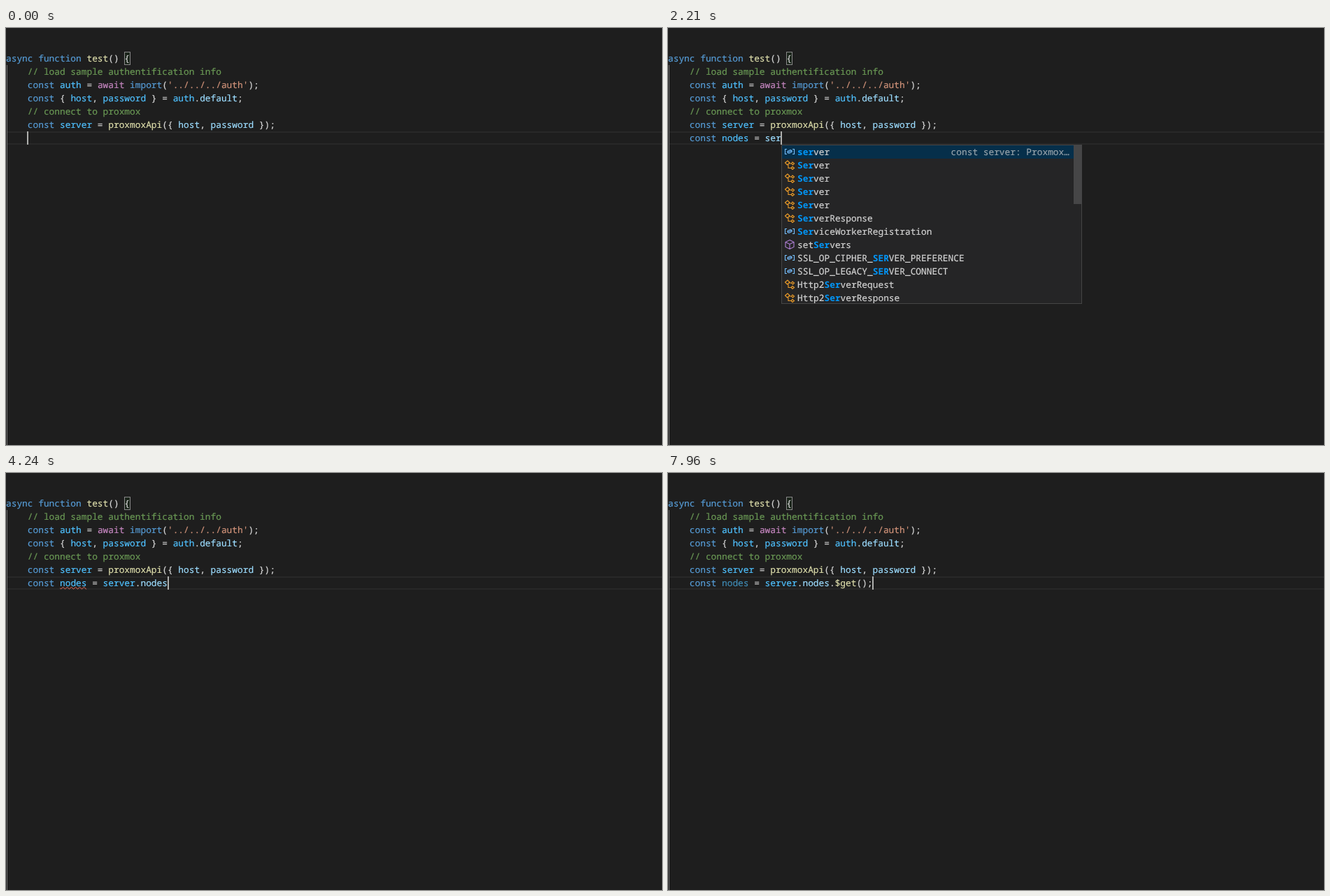
Write an HTML page that moves like this. It is 938 px wide and 597 px high and loops after 8 s.

```html
<!DOCTYPE html>
<html lang="en">
<head>
<meta charset="utf-8">
<title>Editor typing</title>
<style>
html, body { margin: 0; width: 100%; height: 100%; overflow: hidden; background: #1e1e1e; }
#stage {
  position: relative; width: 938px; height: 597px; overflow: hidden;
  background: #1e1e1e; color: #d4d4d4;
  font: 12.83px/18px "Noto Sans Mono", "DejaVu Sans Mono", monospace;
  font-variant-ligatures: none; text-rendering: geometricPrecision;
  -webkit-text-stroke: .2px currentColor;
}
#stage div, #stage svg { position: absolute; box-sizing: border-box; }
#lines, #parens { left: 0; top: 0; }
.row, .box { white-space: pre; }
.row { left: 0; height: 19px; }
.k { color: #569cd6; }
.f { color: #dcdcaa; }
.m { color: #6a9955; }
.c { color: #4fc1ff; }
.d { color: #4fc1ff; opacity: .667; }
.a { color: #c586c0; }
.s { color: #ce9178; }
.v { color: #9cdcfe; }
.t { color: #4ec9b0; }
#current { left: 2px; top: 148px; width: 940px; height: 19px; border: 2px solid #282828; border-width: 2px 0; }
#guide { left: 1px; top: 53px; width: 1px; height: 544px; background: #707070; }
#cursor { top: 148px; width: 2px; height: 19px; background: #aeafad; }
.match { width: 9px; height: 19px; border: 1px solid #888; background: rgba(0, 100, 0, .1); }
#squig { top: 163px; height: 4px; overflow: hidden; }
#squig path { fill: none; stroke: #f1705c; }
.box { background: #252526; border: 1px solid #454545; overflow: hidden; }
#list { top: 167px; width: 430px; }
.item { left: 0; width: 428px; height: 19px; }
.item.on { background: #062f4a; }
.item svg { left: 3px; top: 1px; width: 16px; height: 16px; fill: none; stroke-width: 1.1; }
.item b { color: #0097fb; -webkit-text-stroke: 0; }
.label { left: 22px; }
.detail { left: 241.6px; opacity: .7; }
#bar { left: 417px; top: 0; width: 11px; height: 84px; background: #464647; }
#hint { left: 277px; top: 23px; width: 305px; height: 125px; padding: 4px 5px; line-height: 19px; }
</style>
</head>
<body>
<div id="stage">
  <div id="current"></div>
  <div id="guide"></div>
  <div id="brace" class="match" style="left:169px;top:34px"></div>
  <div id="parens"><div class="match" style="left:269px;top:148px"></div><div class="match" style="left:277px;top:148px"></div></div>
  <div id="lines"></div>
  <div id="typed" class="row" style="top:148px"></div>
  <svg id="squig" height="4"><path/></svg>
  <div id="cursor"></div>
  <div id="list" class="box"></div>
  <div id="hint" class="box"></div>
</div>
<script>
const LOOP = 8000, CH = 7.697, ROW = 19;
const $ = id => document.getElementById(id);
const show = (id, on) => { $(id).style.display = on ? '' : 'none'; };
const esc = s => s.replace(/&/g, '&amp;').replace(/</g, '&lt;');

// "[k const]" becomes a span of class k
const paint = s => esc(s).replace(/\[(\w) ([^\]]*)\]/g, '<span class="$1">$2</span>');
const plain = s => s.replace(/\[\w |\]/g, '');

const lines = [
  '[k async] [k function] [f test]() {',
  '    [m // load sample authentification info]',
  "    [k const] [c auth] = [a await] [k import]([s '../../../auth']);",
  '    [k const] { [c host], [c password] } = [c auth].[v default];',
  '    [m // connect to proxmox]',
  '    [k const] [c server] = [f proxmoxApi]({ [v host], [v password] });'
];
$('lines').innerHTML = lines.map((s, i) =>
  `<div class="row" style="top:${34 + i * ROW}px">${paint(s)}</div>`).join('');

$('hint').innerHTML = paint(`[f $get](): [t Promise]<{
    [v node]: [t string];
    [v status]: [t string];
    [v level]?: [t string];
    [v uptime]?: [t number];
}[]>`);

const icons = {
  v: ['#75beff', 'M4 4.5H1.5v7H4M12 4.5h2.5v7H12M5 9.5v-2l4-2 2 1v2l-4 2zM5 7.5l2 1 4-2'],
  c: ['#ee9d28', 'M1.5 5l3.5-3 3 3-3.5 3zM7 6h4M6 7.5v5h4M10.5 6l1.5-2 2.5 2-2 2zM10 12.5l2-2 2.5 2-2.5 2z'],
  m: ['#b180d7', 'M8 1.5l6 3v7l-6 3-6-3v-7zM2 4.5l6 3 6-3M8 7.5v7'],
  p: ['#c5c5c5', 'M10 2a4 4 0 0 0-3 6L2 13l1.5 1.5L9 9a4 4 0 0 0 5-5l-2.5 2-2-2z'],
  k: ['#c5c5c5', 'M2 4h8M12 4h2M2 8h4M8 8h6M2 12h7M11 12h3']
};

// Each item is icon:label, with the matched letters between stars
const lists = {
  consts: { items: 'k:*const* v:*cons*ole m:*const*ructor c:*Const*antSourceNode m:*con*firm k:*cont*inue c:*Con*volverNode c:*Count*QueuingStrategy v:*c*ryp*to* c:*C*ustom*E*vent c:*C*anvasGradient c:*C*SSRule', bar: true },
  words: { items: 'k:*nodes* k:*node*List' },
  server: {
    items: 'v:*server* c:*Server* c:*Server* c:*Server* c:*Server* c:*Server*Response v:*Serv*iceWorker*Re*gistration m:set*Server*s v:SSL_OP_CIPHER_*SERVER*_PREFERENCE v:SSL_OP_LEGACY_*SERVER*_CONNECT c:Http2*Server*Request c:Http2*Server*Response',
    detail: 'const server: Proxmox…', bar: true
  },
  api: { items: 'p:access p:cluster p:nodes p:pools p:storage p:version', detail: '(property) nodes: { $…' },
  calls: { items: 'm:$ m:$get', detail: '(method) $get(): Prom…' }
};

// Bold only the first n matched letters
function mark(label, n) {
  return label.split('*').map((part, i) => {
    if (i % 2 === 0) return part;
    const hit = part.slice(0, n);
    n -= hit.length;
    return `<b>${hit}</b>${part.slice(hit.length)}`;
  }).join('');
}

function drawList({ list, sel, n }, col) {
  show('list', list);
  if (!list) return;
  const { items, detail = '', bar } = lists[list];
  const rows = items.split(' ');
  const el = $('list');
  el.style.left = Math.round(col * CH) + 'px';
  el.style.height = rows.length * ROW + 'px';
  el.innerHTML = rows.map((row, i) => {
    const [kind, label] = row.split(':');
    const [color, path] = icons[kind];
    const on = i === sel;
    return `<div class="item${on ? ' on' : ''}" style="top:${i * ROW}px">` +
      `<svg viewBox="0 0 16 16" stroke="${color}"><path d="${path}"/></svg>` +
      `<div class="label">${mark(label, n)}</div>` +
      (on ? `<div class="detail">${detail}</div>` : '') + '</div>';
  }).join('') + (bar ? '<div id="bar"></div>' : '');
}

function drawSquig(squig) {
  show('squig', squig);
  if (!squig) return;
  const [col, len] = squig, w = len * CH;
  let d = 'M0 1.5L1.5 3';
  for (let x = 1.5; x < w; x += 6) d += `L${x + 3} .5L${x + 6} 3`;
  $('squig').style.left = Math.round(col * CH) + 'px';
  $('squig').style.width = w + 'px';
  $('squig').firstElementChild.setAttribute('d', d);
}

const head = '[k const] ', dim = head + '[d nodes]', lit = head + '[c nodes]';
const under = [10, 5], call = ' = [c server].[v nodes]';

const steps = [
  [0, { code: '', caret: true, back: 0, squig: null, list: null, sel: 0, n: 9, brace: true, parens: false, hint: false }],
  [180, { code: '[v c]', list: 'consts', n: 1 }],
  [260, { code: '[v co]', n: 2 }],
  [340, { code: '[v con]', n: 3 }],
  [420, { code: '[v cons]', n: 4 }],
  [490, { code: '[k const]', n: 5 }],
  [660, { code: head, list: null }],
  [890, { squig: [4, 5] }],
  [970, { code: head + '[c n]', squig: null }],
  [1050, { code: head + '[c no]', list: 'words', n: 2 }],
  [1130, { code: head + '[c node]', n: 4 }],
  [1210, { code: head + '[d node][c s]', squig: [10, 4], n: 5 }],
  [1360, { code: dim + ' ', squig: under, list: null }],
  [1660, { code: dim + ' =' }],
  [1830, { code: dim + ' = ' }],
  [1910, { code: lit + ' = ', squig: null }],
  [1990, { code: lit + ' = [v s]' }],
  [2060, { list: 'server', n: 1 }],
  [2140, { code: lit + ' = [v se]', n: 2 }],
  [2210, { code: lit + ' = [v ser]', n: 3 }],
  [2290, { code: lit + ' = [v serv]', n: 4 }],
  [2460, { code: lit + ' = [v serve]', n: 5 }],
  [2540, { code: lit + ' = [v server]', n: 6 }],
  [2710, { code: dim + ' = [c server]' }],
  [3010, { list: null }],
  [3160, { code: dim + ' = [c server].', list: 'api', sel: 2 }],
  [3560, { code: lit + ' = [c server].', squig: under }],
  [3640, { caret: false }],
  [3940, { caret: true }],
  [4240, { code: lit + call, list: null }],
  [4550, { code: lit + call + '.', list: 'calls', sel: 0 }],
  [4630, { code: dim + call + '.', squig: null }],
  [4940, { code: lit + call + '.', squig: under }],
  [5020, { caret: false }],
  [5930, { caret: true, sel: 1 }],
  [6250, { code: lit + call + '.[v $get]', list: null }],
  [6400, { code: dim + call + '.[f $get]' }],
  [6650, { code: dim + call + '.[f $get]()', back: 1, brace: false, parens: true }],
  [6730, { hint: true }],
  [6810, { squig: null }],
  [6890, { back: 0 }],
  [6970, { hint: false }],
  [7350, { caret: false }],
  [7810, { code: dim + call + '.[f $get]();', caret: true }],
  [7890, { parens: false, brace: true }]
];
let state = {};
const states = steps.map(([at, change]) => [at, state = { ...state, ...change }]);

function draw(s) {
  const col = 4 + plain(s.code).length - s.back;
  $('typed').innerHTML = '    ' + paint(s.code);
  $('cursor').style.left = Math.floor(col * CH + .2) + 'px';
  show('cursor', s.caret);
  for (const id of ['brace', 'parens', 'hint']) show(id, s[id]);
  drawSquig(s.squig);
  drawList(s, col);
}

let shown = -1;
const start = performance.now();
function tick() {
  const t = (performance.now() - start) % LOOP;
  let i = states.length - 1;
  while (states[i][0] > t) i--;
  if (i !== shown) draw(states[shown = i][1]);
  requestAnimationFrame(tick);
}
tick();
</script>
</body>
</html>
```
